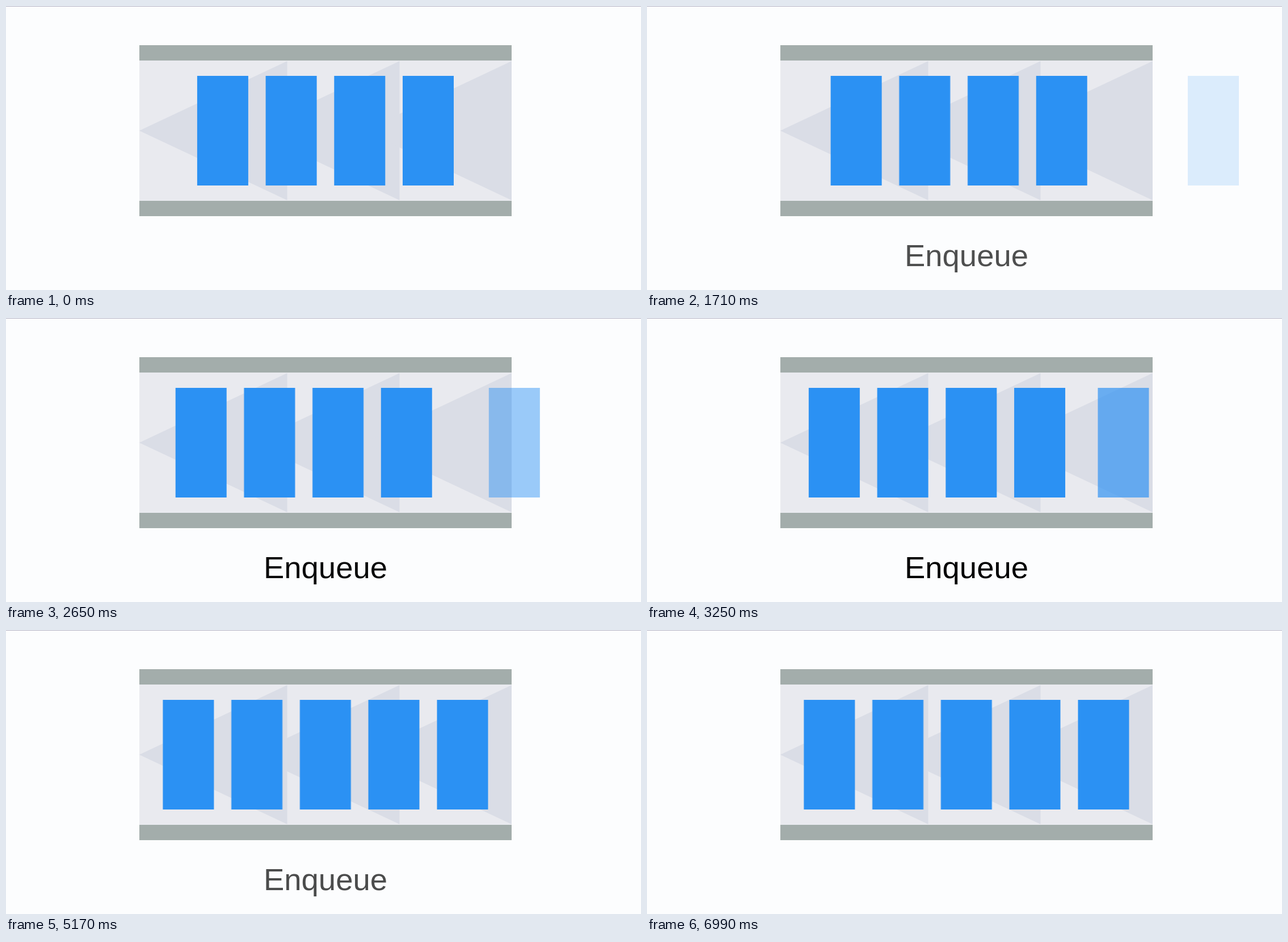
Recreate the animation shown at these times as an HTML page. Size 1119x500 px, loop 8 s.

```html
<!DOCTYPE html>
<html lang="en">
<head>
<meta charset="utf-8">
<title>Enqueue</title>
<style>
  html, body { margin: 0; width: 100%; height: 100%; overflow: hidden; background: #fcfdfe; }
  svg { display: block; width: 1119px; height: 500px; }

  .bar { fill: #a3adab; }
  .lane { fill: #e9eaef; }
  .arrow { fill: #dadde6; }
  .item { fill: #2b91f3; }
  text { font: 54.5px "Liberation Sans", Arial, sans-serif; text-anchor: middle; }

  /* The script advances --t, so every animation is a function of the clock. */
  .queue, .incoming, .label { animation: 8s linear var(--t, 0ms) infinite both paused; }
  .queue { animation-name: shift; }
  .incoming { animation-name: enter, appear; }
  .label { animation-name: caption; }

  @keyframes shift {
    0%, 6.29% { transform: translateX(0); animation-timing-function: ease-in-out; }
    52.75%, 100% { transform: translateX(-60.5px); }
  }
  @keyframes enter {
    0%, 6.29% { transform: translateX(248px); animation-timing-function: ease-in-out; }
    52.75%, 100% { transform: translateX(0); }
  }
  @keyframes appear {
    0%, 15.6% { opacity: 0; }
    52.75%, 100% { opacity: 1; }
  }
  @keyframes caption {
    0%, 6.56% { opacity: 0; animation-timing-function: cubic-bezier(.333, .667, .667, 1); }
    40% { opacity: 1; }
    46.25% { opacity: 1; animation-timing-function: cubic-bezier(.333, 0, .667, .333); }
    79.75%, 100% { opacity: 0; }
  }
</style>
</head>
<body>
<svg viewBox="0 0 1119 500">
  <defs>
    <path id="arrow" class="arrow" d="M0 219.5 L260.5 97 V342 Z"/>
    <rect id="item" class="item" y="123" width="90" height="193"/>
  </defs>
  <rect width="1119" height="1" fill="#b3b3c4"/>
  <rect class="lane" x="235" y="96" width="656" height="247"/>
  <use href="#arrow" x="235"/>
  <use href="#arrow" x="433"/>
  <use href="#arrow" x="630.5"/>
  <rect class="bar" x="235" y="69" width="656" height="27"/>
  <rect class="bar" x="235" y="343" width="656" height="27"/>
  <g class="queue">
    <use href="#item" x="336.9"/>
    <use href="#item" x="457.6"/>
    <use href="#item" x="578.3"/>
    <use href="#item" x="699"/>
  </g>
  <g class="incoming"><use href="#item" x="759.5"/></g>
  <text class="label" x="563" y="457.5">Enqueue</text>
</svg>
<script>
  const LOOP = 8000, BEAT = 140, PHASE = 270, STEP = 20;
  const start = performance.now();

  // Each beat shows three poses: two short ones, then a long hold.
  function hold(t) {
    const into = (t - PHASE + 2 * BEAT) % BEAT;
    return Math.max(0, t - into + Math.min(Math.floor(into / STEP), 2) * STEP);
  }

  function tick() {
    const t = (performance.now() - start) % LOOP;
    document.documentElement.style.setProperty("--t", -hold(t) + "ms");
    requestAnimationFrame(tick);
  }
  tick();
</script>
</body>
</html>
```
